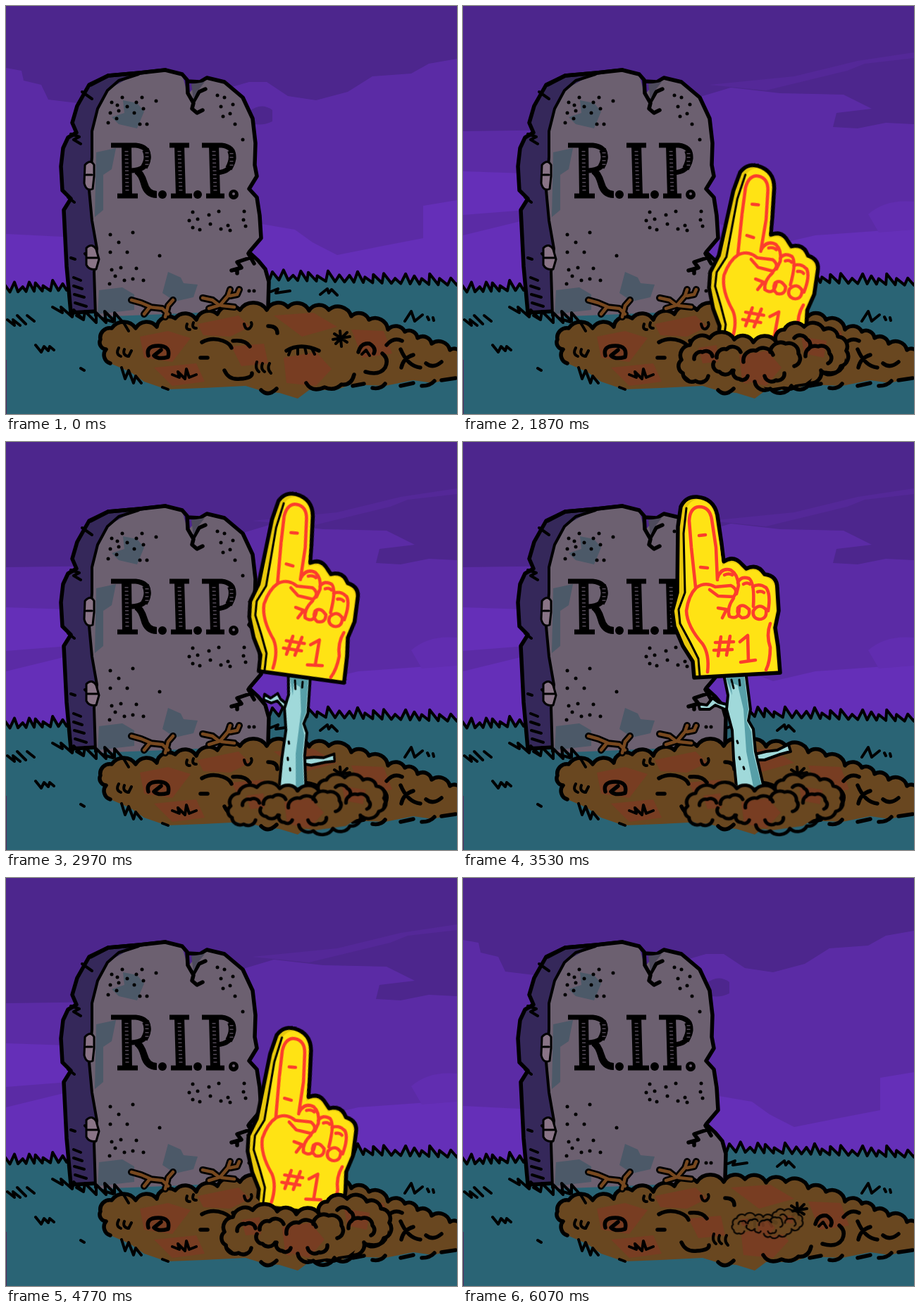
Animation, 640 px wide and 580 px high, one loop 6110 ms. Source, as an HTML page:

```html
<!DOCTYPE html>
<html lang="en">
<head>
<meta charset="utf-8">
<title>Number one from the grave</title>
<style>
  html, body { margin: 0; width: 100%; height: 100%; overflow: hidden; background: #5b2ba5; }
  svg { display: block; width: 640px; height: 580px; }
  .ink { fill: none; stroke: #000; stroke-width: 4; stroke-linecap: round; stroke-linejoin: round; }
  .bold { stroke-width: 5.5; }
  .thin { stroke-width: 3; }
  .red { fill: none; stroke: #fc3d2c; stroke-width: 4.6; stroke-linecap: round; stroke-linejoin: round; }
  .dirt { fill: #694720; }
  .clay { fill: #783d22; }
  .moss { fill: #4c5968; }
  .skin { fill: #a0d9da; stroke: #000; stroke-width: 4; stroke-linejoin: round; }

  .dusk, .heap, .hand, .flapL, .flapR { animation: 6110ms linear infinite; }
  .dusk { animation-name: dusk; }
  .heap { animation-name: heap; transform-origin: 436px 485px; }
  .hand { animation-name: hand; transform-origin: 405px 487px; }
  .flapL { animation-name: flapL; transform-origin: 375px 380px; }
  .flapR { animation-name: flapR; transform-origin: 420px 449px; }

  @keyframes dusk {
    0%, 8% { opacity: 0; }
    17%, 84% { opacity: 1; }
    96%, 100% { opacity: 0; }
  }
  @keyframes heap {
    0%, 1.63% { transform: scale(.1); opacity: 0; }
    1.64% { transform: scale(.1); opacity: 1; }
    9.3% { transform: scale(.42); }
    17.2%, 32% { transform: none; }
    37%, 72% { transform: translateY(17px) scale(.93, .86); }
    77%, 88% { transform: none; }
    99.3% { transform: scale(.42); opacity: 1; }
    99.9%, 100% { transform: scale(.4); opacity: 0; }
  }
  @keyframes hand {
    0%, 13.9% { transform: translateY(425px) rotate(12deg); }
    19.15% { transform: translateY(336px) rotate(12deg); }
    30.6% { transform: translateY(156px) rotate(12deg); animation-timing-function: cubic-bezier(.3, .3, .6, 1); }
    38.13% { transform: translateY(4px) rotate(16.5deg); animation-timing-function: ease-in-out; }
    44.68% { transform: none; animation-timing-function: ease-in-out; }
    51.23% { transform: translateY(4px) rotate(16.5deg); animation-timing-function: ease-in-out; }
    57.77% { transform: none; animation-timing-function: ease-in-out; }
    64.32% { transform: translateY(4px) rotate(16.5deg); animation-timing-function: ease-in-out; }
    70.87% { transform: translateY(4px) rotate(9deg); animation-timing-function: ease-in; }
    78.07% { transform: translate(-2px, 142px) rotate(11deg); }
    90%, 100% { transform: translateY(425px) rotate(12deg); }
  }
  @keyframes flapL {
    0%, 38.13%, 51.23%, 64.32%, 100% { transform: rotate(18deg) scaleX(.75); }
    44.68%, 57.77% { transform: none; }
  }
  @keyframes flapR {
    0%, 38.13%, 51.23%, 64.32%, 100% { transform: scaleX(.75); }
    44.68%, 57.77% { transform: none; }
  }
</style>
</head>
<body>
<svg viewBox="0 0 640 580">
  <defs>
    <clipPath id="ground"><path d="M0 0H640V470H470L430 487L412 492L388 488L352 452L300 440H0Z"/></clipPath>
  </defs>

  <!-- sky -->
  <path fill="#5b2ba5" d="M0 0H640V420H0Z"/>
  <path fill="#4d268d" d="M0 0H640V75L600 82L575 96L520 100L485 122L440 134L400 128L370 108L345 108L200 150L60 133L50 112L25 106L22 92L0 88Z"/>
  <path fill="#4d268d" d="M345 150Q362 136 378 148V164Q362 172 345 166Z"/>
  <path fill="#652fb8" d="M0 324L80 328L200 330L352 308L410 318L435 336L470 354L530 342L592 330V284L640 276V420H0Z"/>
  <g class="dusk">
    <path fill="#5b2ba5" d="M0 0H640V420H0Z"/>
    <path fill="#4d268d" d="M0 0H640V168L600 166L560 174L525 172L530 152L580 146L540 126L450 124L380 116L300 140L150 176L0 178Z"/>
    <path fill="#5428 98" d="M0 0"/>
    <path fill="#542898" d="M350 112L430 120L545 92L570 82L640 74V66L560 78L470 100Z"/>
    <path fill="#652fb8" d="M0 235L90 238V290L0 297ZM0 326L90 304L360 308L440 340L500 326L640 316V420H0Z"/>
    <path fill="#612db0" d="M575 296Q600 274 640 278V318L590 322Z"/>
  </g>

  <!-- field -->
  <path id="field" fill="#2a6475"/>
  <path fill="#52295f" d="M0 503h1v77h-1Z"/>
  <path id="blades" class="ink"/>
  <path class="ink" d="M2 446l10 8l-2-8l10 8M16 440l12 12M30 440l10 8M42 482l8 10l4-8l6 6l2-6l6 5M106 515l5 3M376 406l10-4l-3 6l20-3M446 410l10-8l2 6l4-5l8 8M566 448l9-14l5 14l11-9M598 442l2 4M606 443l1 4"/>

  <!-- tombstone -->
  <path fill="#35285a" class="ink bold" style="fill:#35285a" d="M92 436L86 370L82 290L92 274L80 262L78 228L81 202L88 187L100 180L94 166L101 142L118 112L145 99L190 95L226 91L200 430Z"/>
  <path fill="#6c6070" d="M127 442L125 380L130 345L122 305L120 268L123 180L130 148L146 118L178 100L226 92L250 98L258 126L270 112L285 102L310 108L336 130L350 160L354 195V242L345 260L356 274L360 328L344 350L366 372L373 392V432Z"/>
  <g class="moss">
    <path d="M166 134L186 138L196 150L186 174L160 168L150 158L168 152Z"/>
    <path d="M128 208L156 202L150 232L138 240V290L126 300Z"/>
    <path d="M230 378L248 386L252 394L272 396L266 414L240 420L222 408Z"/>
    <path d="M132 404L165 400L182 410V432L130 438Z"/>
  </g>
  <path class="ink bold" d="M120 112L145 99L190 95L226 91L250 97L257 105L258 124L266 138L264 146L271 152L279 148M266 136L274 122L283 118M257 107L275 108L285 102L310 108L336 130L350 160L354 195L353 226L356 242L345 260L356 272L360 298L362 330L345 350L358 362L368 374L373 392L372 426M344 352L352 366M346 358L328 364L334 372L320 376M328 374L328 380"/>
  <path fill="#4d4a5c" d="M263 111L282 108L271 122L266 133Z"/>
  <path class="ink" d="M188 97L160 106L144 120L130 146L122 178L122 215L118 262L122 305L129 345L125 378L127 440M92 182L104 186L96 190L106 196M88 272L97 279M108 122L122 132M92 358l6 2M96 386l10 4M96 398l12 4M97 410l14 4M98 422l16 5M112 352l6 6"/>
  <path class="ink thin" style="fill:#897486" d="M112 226q8-9 13 0v16l-2 18q-9 4-12-8ZM114 344q8-8 14 2l4 14l-4 14q-10 2-14-6ZM115 358h16M114 240h8"/>
  <g id="specks"></g>

  <!-- carved lettering -->
  <g class="ink" style="stroke-linecap:butt">
    <path stroke-width="14" style="stroke-width:14" d="M171 198L172 270M246 198L248 270M295 198L297 270"/>
    <path style="stroke-width:7" d="M149 198H184Q203 200 202 216Q200 233 178 234M158 270H187M232 198H260M234 270H264M278 198H306Q324 200 323 217Q320 236 299 237M284 270H310"/>
    <path style="stroke-width:10" d="M198 204Q204 216 196 229M319 205Q324 217 316 231M185 234Q192 238 196 252Q200 268 214 268"/>
    <path stroke="#544a58" style="stroke:#544a58;stroke-width:5;stroke-dasharray:1.5 4" d="M171 206L172 264M246 206L248 264M295 206L297 264M200 208V226M320 209V228"/>
  </g>
  <g><circle cx="222" cy="268" r="6"/><circle cx="272" cy="268" r="6"/><circle cx="323" cy="268" r="7"/></g>
  <circle cx="323" cy="267" r="2" fill="#6c6070"/>

  <!-- mound -->
  <path id="mound" class="dirt"/>
  <g class="clay">
    <path d="M190 470L230 462L262 472L236 506L196 500ZM272 452L330 440L346 456L318 470L280 468ZM210 514L270 508L282 534L236 540Z"/>
    <path d="M394 500L440 492L462 516L440 540L398 536ZM380 440L436 436L470 456L420 470ZM490 460L536 462L548 494L506 500ZM320 484L366 480L372 508L334 512Z"/>
  </g>
  <path id="rim" class="ink bold"/>
  <path class="ink" d="M160 486q-5 9 3 12M168 488q-3 8 5 10M178 490l-4 8M257 452q-3 8 4 8M266 450q-3 8 4 8M338 452q2 10 8 6q4-4 2-8M356 506q-3 9 3 14M364 508q-3 8 3 12M374 508q-4 8 2 14M404 488l-3 8M414 486v9M424 485l2 9M434 487l4 8M466 466l18 12M484 464l-16 16M474 462l2 22M464 474l24-4M505 495l6-6l5 8M236 524l10 4l-2-8l10 10l2-14l4 12l10-4M164 514l5 16l5-12l7 18l3-10l8 10M222 542l8 3"/>
  <path class="ink bold" d="M202 497q-4-14 14-14q18 0 14 16q-14 4-20-2l10-8M278 478q14-8 30-2q10 4 12 10M322 476q18-2 24 8M276 500h10M310 518q6 14 22 12q18-1 17-8M372 455q13 0 13 10M398 490q20-12 46 0M500 492q4-14 16-12q10 6 6 14M510 520q20 6 28-6q6-12-4-20M560 488q10 24 28 26M578 496q-14 4-17 18M596 508q10 8 22-2M426 536q8 14 26 6q14 6 24-4q14 2 18-14M362 546q10 10 22-2M540 482q10-12 22-6M492 540l16-3M520 543q12 2 18-6M560 540l18-4M590 540q12 0 18-7M618 532l20-3"/>

  <!-- roots on the stone -->
  <path id="rootInk" class="ink" style="stroke-width:10" d="M178 418l14 4l14 6M196 438l8-10l18 2l8 8M226 442l4-16l7-8M279 415l14 3l9 7M288 430l16-5l11-13l3-9M318 412l10-2l3-7M306 426l18 2"/>
  <path class="ink" style="stroke:#77481f;stroke-width:4.5" d="M178 418l14 4l14 6M196 438l8-10l18 2l8 8M226 442l4-16l7-8M279 415l14 3l9 7M288 430l16-5l11-13l3-9M318 412l10-2l3-7M306 426l18 2"/>
  <path class="ink" d="M66 428l14 8l-2-8l16 14l2-10l14 14l2-12l16 16l0-14l14 14l-2-16l14 14l0-12l14 16l6 10M100 440l10 6M136 444l16 5"/>

  <!-- foam finger on its arm -->
  <g clip-path="url(#ground)">
    <g class="hand">
      <path class="skin flapL" d="M376 382L358 374L350 380L336 380L334 372L346 374L354 364L362 370L378 374Z"/>
      <path class="skin flapR" d="M414 444L430 440L446 438L462 430L465 440L450 444L428 452L414 452Z"/>
      <path class="skin" d="M369 326L376 360L374 380L382 410L384 450L388 490L404 660H450L426 487L415 440L412 408L405 396L408 380L401 326Z"/>
      <path fill="#579fa8" d="M372 332L399 332L405 380L402 396L409 412L412 442L424 490L446 658H436L412 490L402 440L398 380L390 346L380 342L382 360Z"/>
      <path class="ink thin" d="M381 338l3 12M392 338l1 8M392 448l1 3M398 462l1 3M389 425l1 3"/>
      <path class="ink bold" style="fill:#e8c90c" d="M328 335L326 312L312 290L300 262L297 240L304 214L305 120L309 92Q316 77 332 78Q356 80 361 104L367 145L370 170Q384 160 396 174L402 180Q418 172 428 188Q446 190 446 208L448 240L443 264L447 290L450 328Z"/>
      <path fill="#ffe314" d="M336 331L334 308L322 284L308 258L306 240L315 214L313 130L317 96Q322 82 333 82Q353 84 357 105L364 146L368 176Q384 165 394 178L401 185Q417 177 425 191Q442 194 442 209L444 240L439 264L443 290L446 325Z"/>
      <path class="ink thin" d="M317 94L313 130L315 214L306 238L308 258L322 284L334 308L336 333"/>
      <path class="red" d="M330 206L324 150L321 112Q322 93 335 92Q350 92 353 110L359 150L361 196M335 133l9-1M337 178l10 1M347 327Q350 302 340 287Q318 262 317 240Q320 218 331 207Q344 198 358 206L380 204Q392 210 384 220L362 219L350 210M361 194Q366 178 380 182Q390 188 391 204L388 216M390 200Q394 190 406 194Q414 200 412 234M411 206Q420 200 430 207Q437 216 433 240M371 189q6-3 11 0M398 202q5-3 9 0M418 213q5-2 9 1M362 236L374 238L368 250M384 222Q374 236 378 248Q392 254 392 236M390 236Q396 228 406 238Q408 250 396 250Q388 246 390 236M412 240Q420 228 430 238Q432 252 420 252Q410 250 412 240M436 258Q430 274 436 292Q436 312 430 324"/>
      <path class="red" d="M366 277L362 304M379 276L374 303M358 285L384 284M356 296L382 295M393 284L404 275L405 311M394 313L415 310"/>
    </g>
  </g>

  <!-- loose earth -->
  <g class="heap">
    <path id="heapFill" class="dirt"/>
    <path class="clay" d="M392 496L432 490L452 514L430 540L396 532ZM480 470L516 476L512 500L484 494ZM334 486L360 482L362 506L340 508Z"/>
    <path id="heapInk" class="ink bold"/>
  </g>
</svg>

<script>
  const $ = id => document.getElementById(id);
  const draw = (id, d) => $(id).setAttribute('d', d);

  // Chain of round lumps through x,y pairs.
  function lumps(text, bulge = 0.6) {
    const p = text.split(' ').map(s => s.split(',').map(Number));
    return p.map(([x, y], i) => {
      if (!i) return `M${x} ${y}`;
      const r = Math.hypot(x - p[i - 1][0], y - p[i - 1][1]) * bulge;
      return `A${r} ${r} 0 0 1 ${x} ${y}`;
    }).join('');
  }

  // Leaning grass blades between two points.
  function blades(x0, y0, x1, y1, n) {
    let d = '';
    for (let i = 0; i <= n; i++) {
      const k = i / n, x = x0 + (x1 - x0) * k, y = y0 + (y1 - y0) * k;
      const tall = 11 + 4 * Math.sin(i * 2.3);
      d += `L${x} ${y}l${4 + 3 * Math.sin(i)} ${-tall}`;
    }
    return d.slice(1);
  }
  const left = blades(-6, 407, 86, 404, 8);
  const right = blades(374, 389, 640, 397, 20);
  draw('blades', `M${left}M${right}`);
  draw('field', `M${left}L100 410L372 400L${right}L640 580H0Z`);

  const specks = [
    '150,137 165,130 158,141 185,137 193,130 213,135 148,152 172,143 160,149 145,166 157,160 182,152 190,168 200,168 195,146',
    '300,127 310,130 322,140 305,143 318,153 325,168 308,157 336,190 345,405 352,405',
    '265,293 272,303 288,297 302,292 260,305 265,315 275,318 290,310 305,317 315,312 318,319 338,292 337,304 340,313',
    '148,325 180,322 160,336 172,350 148,350 218,355 150,375 163,372 185,373 180,388 195,390 147,395 168,390 155,384'
  ].join(' ').split(' ');
  $('specks').innerHTML = specks.map(s => {
    const [x, y] = s.split(',');
    return `<circle cx="${x}" cy="${y}" r="2.5"/>`;
  }).join('');

  const rim = lumps('148,508 142,488 134,474 150,458 184,458 214,456 240,444 270,446 300,438 332,432 370,432 400,428 430,433 458,432 490,441 515,446 542,460 566,463 584,472 604,480 630,489 646,495');
  draw('rim', rim);
  draw('mound', rim + 'V526L606 536L578 532L538 540L490 538L468 546L430 546L414 558L388 550L366 548L340 540L280 543L228 545L196 534L176 520Z');

  const crest = lumps('312,522 310,503 322,482 350,472 385,474 412,478 444,477 456,460 484,456 512,460 532,470 544,490');
  draw('heapFill', crest + 'L540 512L508 520L486 536L440 543L412 540L380 520L350 530L326 534Z');
  draw('heapInk', crest + [
    '544,490 536,512 510,520', '508,518 492,536 466,540 436,544 414,534',
    '348,526 330,533 312,522', '382,518 364,520 356,506',
    '360,500 374,488 394,492', '398,506 416,490 440,496', '436,492 458,480 476,494 470,512',
    '470,472 488,474 490,488', '486,498 504,484 520,494 518,508', '328,502 340,492 354,498',
    '404,526 392,530 384,518', '456,522 444,532 428,526'
  ].map(s => lumps(s)).join(''));
</script>
</body>
</html>
```
